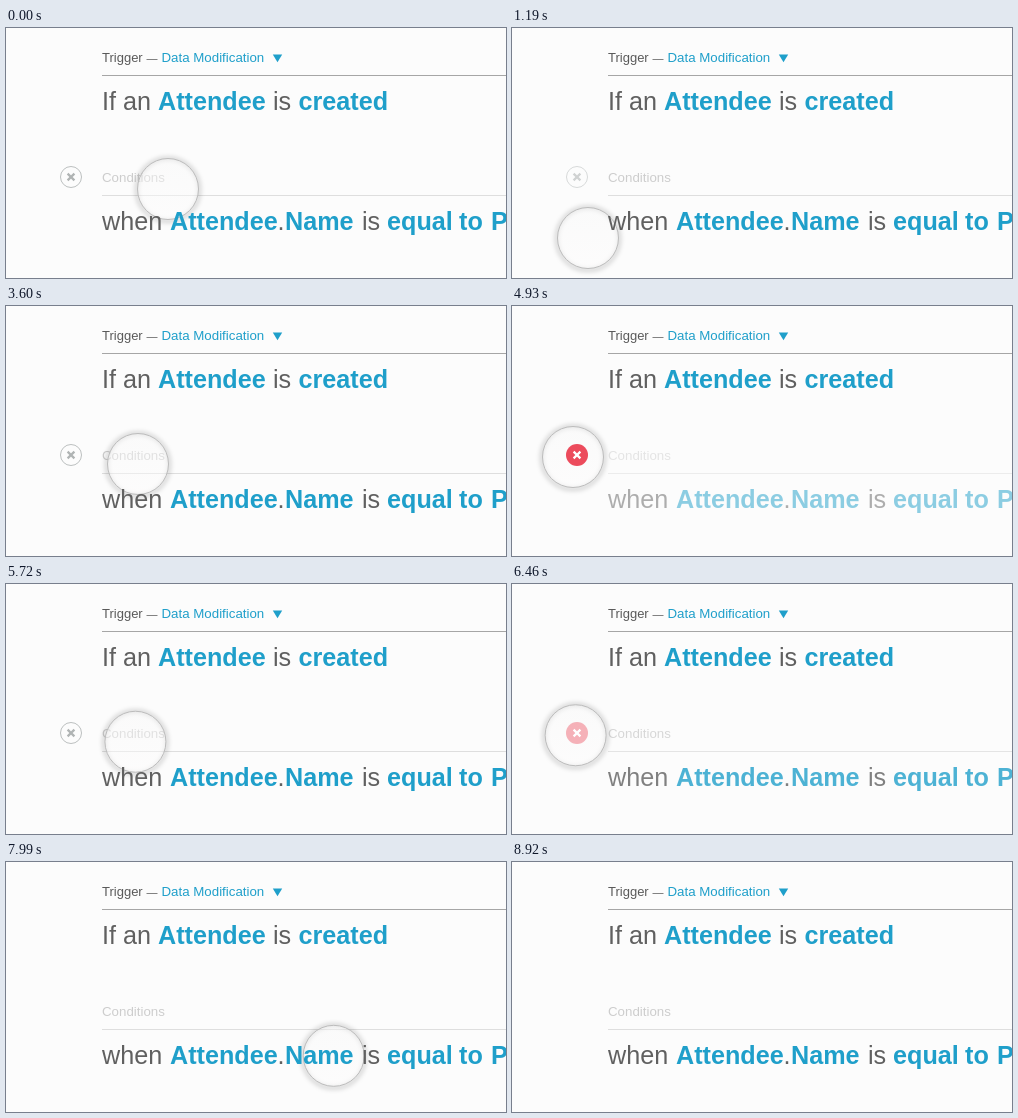
An HTML page that plays this animation: 500 by 250 pixels, repeating every 8.98 s.

```html
<!DOCTYPE html>
<html lang="en">
<head>
<meta charset="utf-8">
<title>Rule editor hover</title>
<style>
html, body { margin: 0; width: 100%; height: 100%; overflow: hidden; background: #fcfcfc; }
svg { display: block; width: 500px; height: 250px; font-family: "Liberation Sans", Arial, sans-serif; }
.big { font-size: 25.2px; fill: #606060; }
.small { font-size: 13px; fill: #5a5a5a; }
.key { font-weight: bold; fill: #1f9fca; }
.link { font-size: 13.3px; fill: #1f9fca; }
</style>
</head>
<body>
<svg viewBox="0 0 500 250">
  <defs>
    <linearGradient id="glass" x1="0" y1="0" x2="0" y2="1">
      <stop offset="0" stop-color="#f8f8f8"/>
      <stop offset="1" stop-color="#fdfcfc"/>
    </linearGradient>
    <filter id="soft" x="-30%" y="-30%" width="160%" height="160%">
      <feGaussianBlur stdDeviation="2"/>
    </filter>
    <path id="x" d="M-3.4-3.4L3.4 3.4M3.4-3.4L-3.4 3.4" stroke-width="2.2"/>
  </defs>
  <rect width="500" height="250" fill="#fcfcfc"/>

  <text class="small" x="96" y="34">Trigger</text>
  <text class="small" x="140.5" y="33.5" style="font-size:11px">—</text>
  <text class="link" x="155.5" y="34">Data Modification</text>
  <path d="M266.8 26.5h9.4l-4.7 7.8z" fill="#1f9fca"/>
  <path d="M96 47.5H500" stroke="#a6a6a6"/>
  <text class="big" y="82"><tspan x="96">If an</tspan><tspan class="key" x="152">Attendee</tspan><tspan x="267">is</tspan><tspan class="key" x="292.5">created</tspan></text>

  <g class="condition">
    <text x="96" y="154" font-size="13.3" fill="#cdcdcd">Conditions</text>
    <path d="M96 167.5H500" stroke="#dedede"/>
  </g>

  <g id="cursor">
    <circle r="31.5" cy=".8" fill="none" stroke="#000" stroke-opacity=".15" stroke-width="4" filter="url(#soft)"/>
    <circle r="30.5" fill="url(#glass)" fill-opacity=".45" stroke="#bcbcbc"/>
  </g>

  <text class="big condition" y="202"><tspan x="96">when</tspan><tspan class="key" x="164">Attendee</tspan><tspan x="271.5">.</tspan><tspan class="key" x="279">Name</tspan><tspan x="356">is</tspan><tspan class="key" x="381">equal</tspan><tspan class="key" x="453">to</tspan><tspan class="key" x="485">P</tspan></text>

  <g transform="translate(65 149)" fill="none">
    <g id="idle">
      <circle r="10.5" stroke="#bcc0c0"/>
      <use href="#x" stroke="#b0b4b4"/>
    </g>
    <circle id="active" r="11" fill="#ec4b5c"/>
    <use id="cross" href="#x" stroke="#fff"/>
  </g>
</svg>
<script>
const LOOP = 8980, CURSOR_END = 8920, FADE = 200, SAMPLES = 40;
const $ = id => document.getElementById(id);
const clamp = v => Math.max(0, Math.min(1, v));
const ease = u => u * u * (3 - 2 * u);

const START = [162, 161], HEADER = [145, 158], ROW = [132, 158],
  BELOW = [58, 213], BUTTON = [61, 151], EXIT = [474, 272];

// bend: powers applied to the x and y progress, giving a curved way
const swing = [2.5, 0.6], drop = [0.8, 1.9];
const moves = [
  { from: 240, to: 330, spot: HEADER },
  { from: 750, to: 1290, spot: BELOW, bend: swing },
  { from: 1290, to: 1645, spot: ROW },
  { from: 1645, to: 2770, spot: BELOW, bend: swing },
  { from: 2940, to: 3600, spot: ROW },
  { from: 3750, to: 4550, spot: BUTTON },
  { from: 5110, to: 5800, spot: ROW },
  { from: 6010, to: 6520, spot: BUTTON },
  { from: 7090, to: 8720, spot: EXIT, bend: drop }
];

function pointer(t) {
  let at = START;
  for (const { from, to, spot, bend = [1, 1] } of moves) {
    if (t <= from) break;
    const e = ease(clamp((t - from) / (to - from)));
    at = at.map((v, k) => v + (spot[k] - v) * e ** bend[k]);
  }
  return at;
}

const overRow = ([x, y]) => x < 250 && y < 204;
const overButton = ([x, y]) => Math.hypot(x - 65, y - 149) < 10;

// Share of the last FADE ms spent hovering: a linear fade in and out
function hover(test, t) {
  let hits = 0;
  for (let i = 0; i < SAMPLES; i++) hits += test(pointer(t - i * FADE / SAMPLES));
  return hits / SAMPLES;
}

function draw(t) {
  const hot = hover(overButton, t), cursor = $("cursor");
  cursor.setAttribute("transform", `translate(${pointer(t)})`);
  cursor.setAttribute("visibility", t < CURSOR_END ? "visible" : "hidden");
  for (const part of document.querySelectorAll(".condition")) part.setAttribute("opacity", 1 - hot / 2);
  $("idle").setAttribute("opacity", hover(overRow, t) * clamp(1 - 2.5 * hot));
  $("active").setAttribute("opacity", hot);
  $("cross").setAttribute("opacity", clamp(2.5 * hot));
}

const begin = performance.now();
function tick() {
  draw((performance.now() - begin) % LOOP);
  requestAnimationFrame(tick);
}
tick();
</script>
</body>
</html>
```
